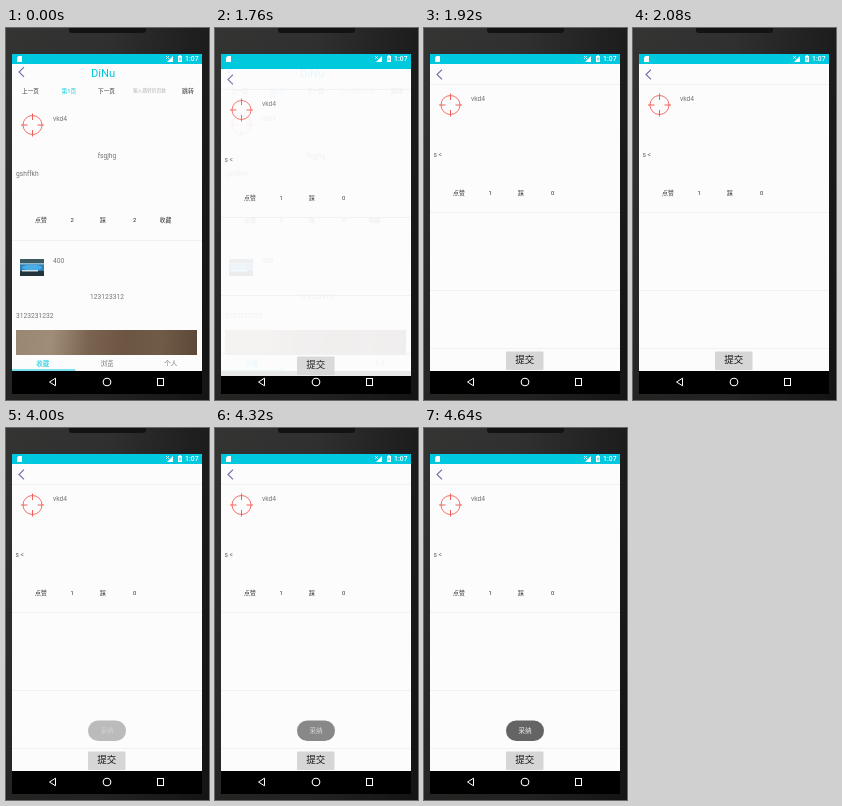
An HTML page with a canvas for the animation above (6240 ms loop, 203 px wide and 372 px high).

```html
<!DOCTYPE html>
<html lang="zh">
<head>
<meta charset="utf-8">
<title>Phone demo</title>
<style>
  html, body { margin: 0; width: 100%; height: 100%; overflow: hidden; background: #242424; }
  canvas { display: block; width: 203px; height: 372px; }
</style>
</head>
<body>
<canvas id="stage"></canvas>
<script>
const W = 203, H = 372, LOOP = 6240;
const OPEN = 1760, SETTLE = 1920, TOAST = 4000, STEP = 160;
const TOAST_ALPHA = [0.43, 0.6, 0.76, 0.9, 1];
const FONT = 'Roboto, "Noto Sans CJK SC", "Noto Sans CJK", sans-serif';
const CYAN = '#00c8de', GRAY = '#757575', DARK = '#303030', PAPER = '#fcfcfd';
const LEFT = 6, WIDTH = 190, TOP = 26, BAR = 10, BOTTOM = 343;

const canvas = document.getElementById('stage');
const ctx = canvas.getContext('2d');
const scale = window.devicePixelRatio || 1;
canvas.width = W * scale;
canvas.height = H * scale;

function rect(x, y, w, h, color) {
  ctx.fillStyle = color;
  ctx.fillRect(x, y, w, h);
}

function round(x, y, w, h, r, color) {
  ctx.fillStyle = color;
  ctx.beginPath();
  ctx.roundRect(x, y, w, h, r);
  ctx.fill();
}

// y is the vertical middle of the line
function text(str, x, y, size, color, align = 'left', weight = 400) {
  ctx.font = `${weight} ${size}px ${FONT}`;
  ctx.textAlign = align;
  ctx.textBaseline = 'alphabetic';
  ctx.fillStyle = color;
  ctx.fillText(str, x, y + size * 0.36);
}

function line(points, color, width = 1, close = false) {
  ctx.strokeStyle = color;
  ctx.lineWidth = width;
  ctx.beginPath();
  points.forEach(([x, y]) => ctx.lineTo(x, y));
  if (close) ctx.closePath();
  ctx.stroke();
}

function ring(x, y, r, color, width) {
  ctx.strokeStyle = color;
  ctx.lineWidth = width;
  ctx.beginPath();
  ctx.arc(x, y, r, 0, Math.PI * 2);
  ctx.stroke();
}

function shade(x0, y0, x1, y1, colors) {
  const g = ctx.createLinearGradient(x0, y0, x1, y1);
  colors.forEach((c, i) => g.addColorStop(i / (colors.length - 1), c));
  return g;
}

function divider(y) {
  rect(LEFT, y, WIDTH, 1, '#f0f1f1');
}

function crosshair(x, y) {
  const red = '#f0605a';
  ring(x, y, 9.5, red, 0.9);
  for (const [dx, dy] of [[1, 0], [-1, 0], [0, 1], [0, -1]]) {
    line([[x + dx * 5, y + dy * 5], [x + dx * 11.5, y + dy * 11.5]], red, 1);
  }
}

function chevron(y) {
  line([[18, y - 4.8], [13, y], [18, y + 4.8]], '#6c6caa', 1.1);
}

function bezel() {
  rect(0, 0, W, H, shade(0, 0, W, 0, ['#343433', '#303030', '#1c1c1c']));
  rect(0, 0, W, H, shade(0, 0, 0, H, ['rgba(0,0,0,0)', 'rgba(0,0,0,0.3)']));
  round(63, -4, 77, 9, 3, '#131313');
}

function systemIcons() {
  ctx.fillStyle = '#fff';
  ctx.beginPath();
  ctx.moveTo(12.5, 28);
  ctx.lineTo(16, 28);
  ctx.lineTo(16, 34);
  ctx.lineTo(11, 34);
  ctx.lineTo(11, 29.5);
  ctx.fill();
  ctx.beginPath();
  ctx.moveTo(167, 28);
  ctx.lineTo(167, 34);
  ctx.lineTo(161, 34);
  ctx.fill();
  line([[160, 28], [163, 31]], '#fff', 0.8);
  line([[163, 28], [160, 31]], '#fff', 0.8);
  rect(172, 28, 4, 6, '#fff');
  rect(173, 27.3, 2, 1, '#fff');
  rect(173.5, 29.5, 1, 3, CYAN);
  text('1:07', 192.5, 31, 6.8, '#fff', 'right', 500);

  line([[49.5, 350.2], [43.5, 354], [49.5, 357.8]], '#fff', 1, true);
  ring(101, 354, 3.8, '#fff', 1.1);
  ctx.strokeStyle = '#fff';
  ctx.lineWidth = 1;
  ctx.strokeRect(151.5, 350.5, 6, 7);
}

// White page between the cyan status bar and the black navigation bar
function page() {
  rect(LEFT, TOP, WIDTH, BAR, CYAN);
  rect(LEFT, TOP + BAR, WIDTH, BOTTOM - TOP - BAR, PAPER);
}

function thumbnail(x, y) {
  rect(x, y, 24, 17, '#2f82b8');
  rect(x, y, 24, 4, '#3c5a62');
  rect(x, y + 4, 24, 1.5, '#8fb8cc');
  ctx.fillStyle = '#48aee6';
  ctx.beginPath();
  ctx.ellipse(x + 12, y + 8.5, 10, 3, 0, 0, Math.PI * 2);
  ctx.fill();
  rect(x, y + 12, 24, 5, '#22333c');
  rect(x + 2, y + 11, 16, 1.5, '#cfe0e8');
}

function listPage() {
  page();
  chevron(44);
  text('DiNu', 97, 44.5, 11.2, CYAN, 'center');

  text('上一页', 16, 62.5, 5.7, DARK);
  text('第1页', 55.5, 62.5, 5.7, CYAN);
  text('下一页', 92, 62.5, 5.7, DARK);
  text('输入跳转的页数', 127, 62.5, 4.7, '#b5b5b5');
  text('跳转', 176, 62.5, 5.9, DARK);

  crosshair(26.5, 97);
  text('vkd4', 47, 91, 6.7, GRAY);
  text('fsgjhg', 101, 128, 6.7, GRAY, 'center');
  text('gshffkh', 10, 146, 6.7, GRAY);
  text('点赞', 29, 192, 5.9, DARK);
  text('2', 64.5, 192, 5.9, DARK);
  text('踩', 94, 192, 5.9, DARK);
  text('2', 127, 192, 5.9, DARK);
  text('收藏', 153.5, 192, 5.9, DARK);
  divider(212);

  thumbnail(14, 231);
  text('400', 47, 233, 6.7, GRAY);
  text('123123312', 101, 269, 6.7, GRAY, 'center');
  text('3123231232', 10, 288, 6.7, GRAY);
  rect(10, 302, 181, 25, shade(10, 302, 191, 322, ['#9a8773', '#a08d78', '#7a644f', '#6c5643', '#705b48', '#5d4838']));

  text('收藏', 36.8, 335.5, 6.5, CYAN, 'center');
  text('浏览', 101, 335.5, 6.5, GRAY, 'center');
  text('个人', 164.7, 335.5, 6.5, GRAY, 'center');
  rect(LEFT, 341.5, 63.5, 1, CYAN);
}

function detailPage() {
  page();
  chevron(46.5);
  divider(56);
  crosshair(26.5, 77);
  text('vkd4', 47, 71, 6.7, GRAY);
  text('s <', 9.5, 126.5, 6.7, '#666');
  text('点赞', 29, 164.5, 5.9, DARK);
  text('1', 64.5, 164.5, 5.9, DARK);
  text('踩', 94, 164.5, 5.9, DARK);
  text('0', 127, 164.5, 5.9, DARK);
  [184, 262, 320].forEach(divider);
  round(82, 323.5, 37.5, 18.5, 1, '#d5d6d5');
  text('提交', 100.7, 332, 9.5, '#151515', 'center');
}

function toast(alpha) {
  ctx.globalAlpha = alpha;
  round(82, 292.5, 38, 20.5, 10.2, '#646464');
  text('采纳', 101, 303, 6.6, '#f2f2f2', 'center');
  ctx.globalAlpha = 1;
}

function draw(t) {
  ctx.setTransform(scale, 0, 0, scale, 0, 0);
  bezel();
  rect(LEFT, BOTTOM, WIDTH, 23, '#000');

  if (t < SETTLE) listPage();
  if (t >= OPEN) {
    ctx.save();
    if (t < SETTLE) {
      // The new page rises into place while nearly opaque
      rect(LEFT, TOP, WIDTH, BAR + 5, CYAN);
      ctx.globalAlpha = 0.92;
      ctx.translate(0, 5);
    }
    detailPage();
    ctx.restore();
  }
  if (t >= TOAST) {
    const i = Math.floor((t - TOAST) / STEP);
    toast(TOAST_ALPHA[Math.min(i, TOAST_ALPHA.length - 1)]);
  }
  systemIcons();
}

const start = performance.now();
function tick() {
  draw((performance.now() - start) % LOOP);
  requestAnimationFrame(tick);
}
tick();
</script>
</body>
</html>
```
